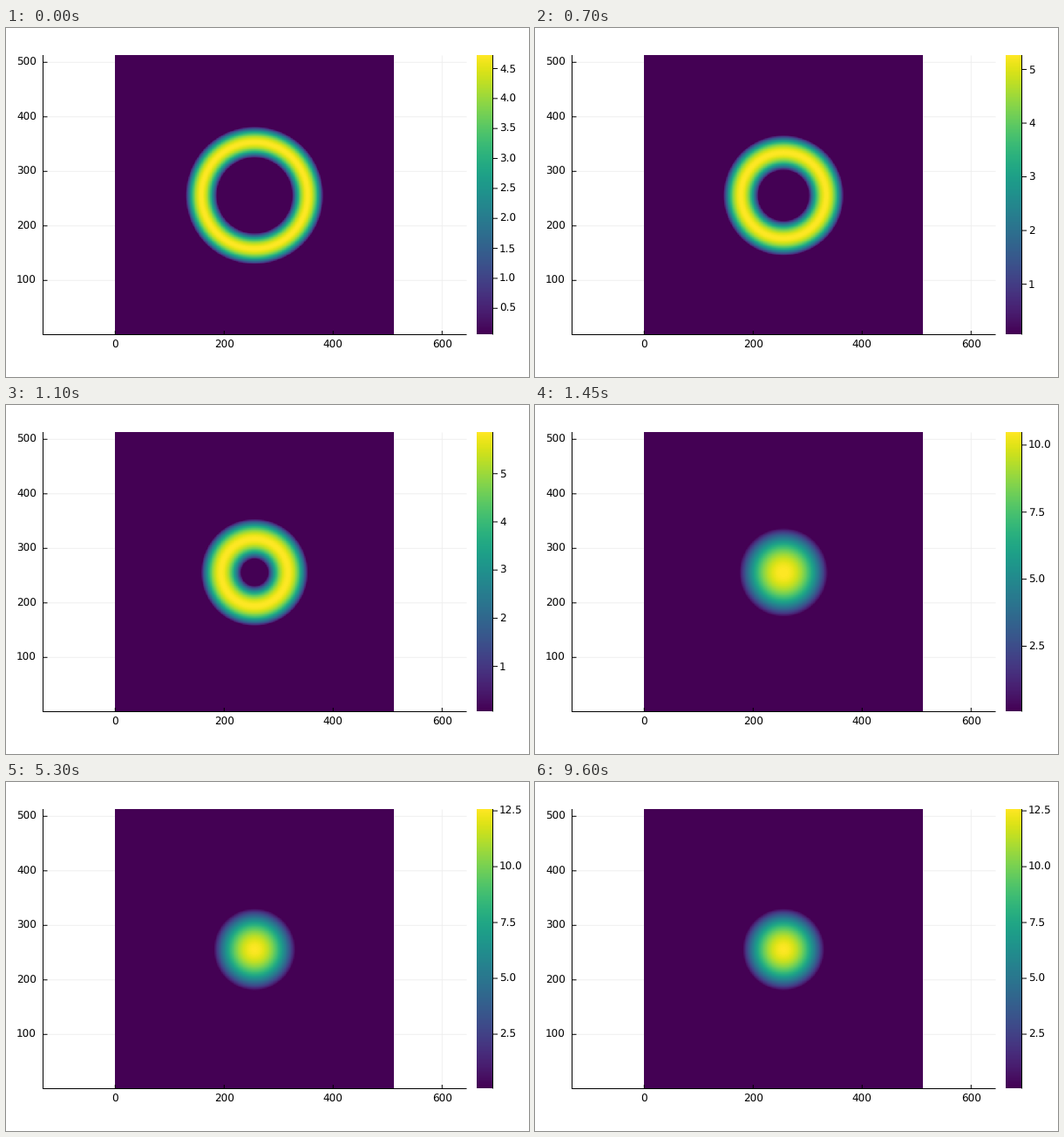
Recreate the animation shown at these times as a matplotlib script. Size 600 px wide and 400 px high, loop 9950 ms.

```python
import numpy as np
import matplotlib.pyplot as plt
from matplotlib.animation import FuncAnimation
from matplotlib.collections import LineCollection

W, H, DPI = 600, 400, 100
FRAMES, STEP_MS = 199, 50
PX = 72 / DPI                      # one pixel in points
LEFT, RIGHT, TOP, BOTTOM = 125, 445, 31, 352
CENTER = 285.2, 191.9
LOW = 0.06                         # value at the bottom of the colour bar
MASS = 43400                       # conserved total of the field
SETTLED = 46.9                     # final disc radius in pixels

plt.rcParams["font.family"] = "DejaVu Sans"
plt.rcParams["text.hinting"] = "none"
fig = plt.figure(figsize=(W / DPI, H / DPI), dpi=DPI, facecolor="white")
ax = fig.add_axes([0, 0, 1, 1])
ax.axis("off")


def label(x, y, text, ha):
    return ax.text(x, y + 4, text, ha=ha, va="baseline",
                   fontsize=12 * PX, color="black")


def lines(segments, width=1, color="black", z=4):
    group = LineCollection(segments, linewidths=width * PX, colors=color,
                           zorder=z, capstyle="butt", snap=False)
    return ax.add_collection(group)


# Axes, grid and fixed labels
x_ticks = [(125.3 + 0.625 * v, v) for v in range(0, 601, 200)]
y_ticks = [(351.8 - 0.625 * v, v) for v in range(100, 501, 100)]
lines([[(x, 31.5), (x, 351.5)] for x, _ in x_ticks]
      + [[(43, y), (528.5, y)] for y, _ in y_ticks], 0.9, "#eeeeee", 1)
lines([[(42.5, 31), (42.5, 352)], [(42.5, 351.5), (528.5, 351.5)]]
      + [[(x, 351.5), (x, 347)] for x, _ in x_ticks]
      + [[(42.5, y), (47.5, y)] for y, _ in y_ticks])
for x, v in x_ticks:
    label(x, 363.3, str(v), "center")
for y, v in y_ticks:
    label(35, y, str(v), "right")

# Heatmap and colour bar
unit = (np.arange(512) + 0.5) / 512
radius = np.hypot(LEFT + unit * (RIGHT - LEFT) - CENTER[0],
                  (TOP + unit * (BOTTOM - TOP) - CENTER[1])[:, None])
heat = ax.imshow(np.zeros_like(radius), cmap="viridis", vmin=0, vmax=1,
                 extent=(LEFT, RIGHT, BOTTOM, TOP), interpolation="nearest",
                 aspect="auto", zorder=2)
ax.imshow(np.linspace(1, 0, 320)[:, None], cmap="viridis", vmin=0, vmax=1,
          extent=(540, 558, 351, TOP), interpolation="nearest",
          aspect="auto", zorder=2)
lines([[(558.5, 31), (558.5, 351.5)]])
bar_ticks = lines([])
bar_labels = [label(566, 0, "", "left") for _ in range(10)]
ax.set_xlim(0, W)
ax.set_ylim(H, 0)

edge_curve = np.polyfit([0, 14, 22, 29], [79, 69.1, 61.4, 50.75], 3)
crest_curve = np.polyfit([0, 14, 22], [61, 49, 38.3], 2)


def shape(n):
    """Radius of the crest and half width of the parabolic ring."""
    if n <= 29:
        edge = np.polyval(edge_curve, n)
    else:
        edge = SETTLED + (50.75 - SETTLED) * np.exp(-(n - 29) / 2.5)
    if n <= 22:
        crest = np.polyval(crest_curve, n)
    else:
        crest = np.interp(n, range(22, 32),
                          [38.3, 36.4, 34.2, 31.6, 28.4, 20.7, 10, 1.85, 0.4, 0])
    return crest, edge - crest


def peak(m, w):
    """Crest height that keeps the total mass constant."""
    a = min(m, w)
    area = m * (w + a) + (w**2 - a**2) / 2
    loss = ((w**4 - a**4) / 4 + m * (w**3 + a**3) / 3) / w**2
    return MASS / (2 * np.pi * (area - loss))


def tick_step(top):
    for limit, step in ((5, 0.5), (8, 1), (10, 2)):
        if top < limit:
            return step
    return 2.5


def update(n):
    m, w = shape(n)
    heat.set_data(np.clip(1 - ((radius - m) / w) ** 2, 0, 1))

    top = peak(m, w)
    step = tick_step(top)
    values = step * np.arange(1, int(top / step) + 1)
    ys = 351.5 - (values - LOW) / (top - LOW) * 320
    bar_ticks.set_segments([[(558.5, y), (564, y)] for y in ys])
    for text in bar_labels:
        text.set_text("")
    for text, v, y in zip(bar_labels, values, ys):
        text.set_text(f"{v:.1f}" if step % 1 else f"{v:.0f}")
        text.set_y(y + 4)
    return [heat, bar_ticks, *bar_labels]


anim = FuncAnimation(fig, update, frames=FRAMES, interval=STEP_MS,
                     repeat=True, repeat_delay=0, blit=False)
plt.show()
```
